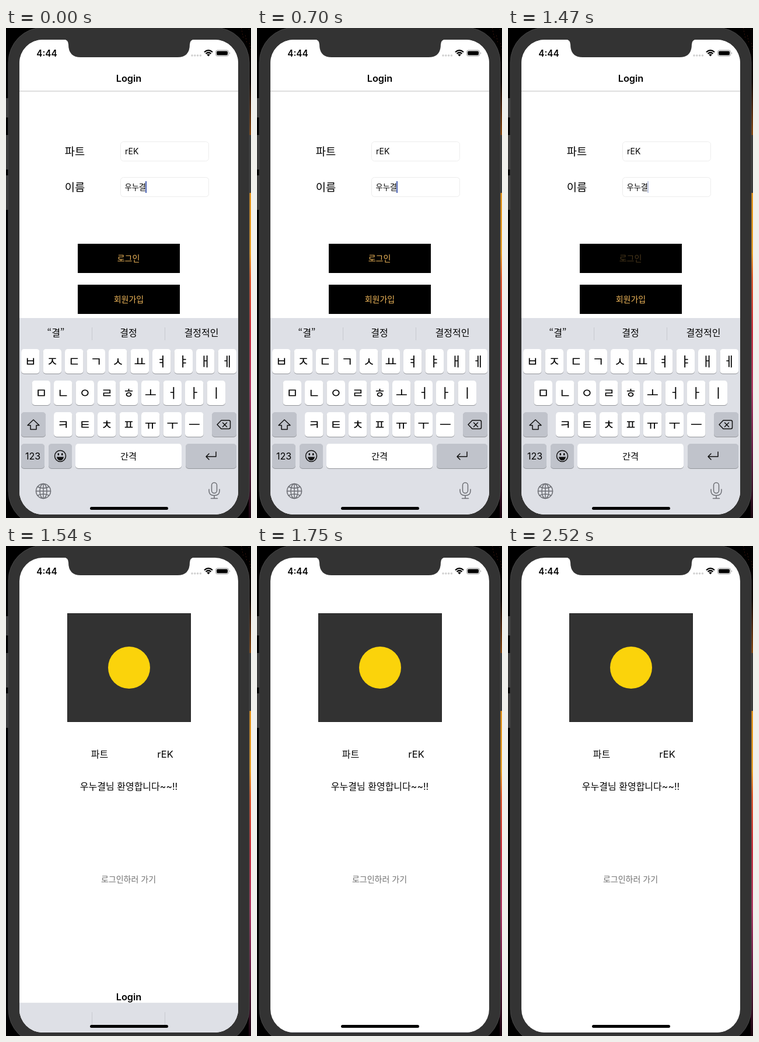
Animation, 420 px wide and 838 px high, one loop 2870 ms. Source, as an HTML page:

```html
<!DOCTYPE html>
<html lang="ko">
<head>
<meta charset="utf-8">
<title>Login</title>
<style>
  html, body { margin: 0; width: 100%; height: 100%; overflow: hidden; background: #000; }
  svg { display: block; width: 420px; height: 838px; }
  text { font-family: 'Noto Sans CJK KR', 'Noto Sans CJK', sans-serif; white-space: pre; }
  .latin { font-family: Inter, 'Noto Sans CJK KR', sans-serif; }
  .line { fill: none; stroke: #111; stroke-width: 1.5; stroke-linejoin: round; stroke-linecap: round; }
  .soft { stroke: #6c6e74; }
</style>
</head>
<body>
<svg viewBox="0 0 420 838">
  <defs>
    <clipPath id="screenClip"><rect x="23" y="20" width="375" height="812" rx="40"/></clipPath>
    <linearGradient id="wall" x1="0" y1="0" x2="0" y2="1">
      <stop offset="0" stop-color="#000"/>
      <stop offset=".11" stop-color="#0c0503"/>
      <stop offset=".16" stop-color="#4b250e"/>
      <stop offset=".22" stop-color="#8a4a12"/>
      <stop offset=".34" stop-color="#e3941c"/>
      <stop offset=".46" stop-color="#e8a02a"/>
      <stop offset=".51" stop-color="#dd5a30"/>
      <stop offset=".62" stop-color="#c83040"/>
      <stop offset=".74" stop-color="#b03a66"/>
      <stop offset=".86" stop-color="#6a1f48"/>
      <stop offset="1" stop-color="#1c0812"/>
    </linearGradient>
  </defs>

  <rect width="420" height="838"/>
  <rect x="416" width="4" height="838" fill="url(#wall)"/>
  <g id="specks" fill="#5c2416"></g>
  <g fill="#3d3d3d">
    <rect y="120" width="6" height="33"/>
    <rect y="183" width="6" height="59"/>
    <rect y="252" width="6" height="59"/>
    <rect x="415" y="183" width="5" height="99"/>
  </g>
  <rect x="4" y="-1" width="413" height="853" rx="60" fill="#333" stroke="#444"/>

  <g clip-path="url(#screenClip)">
    <rect x="23" y="20" width="375" height="812" fill="#fff"/>
    <g id="home">
      <rect x="105.500" y="115.500" width="211" height="185" fill="#323232" stroke="#262626"/>
      <circle cx="211" cy="208" r="36" fill="#fbd30b"/>
    </g>
    <g id="login">
      <rect x="23" y="20" width="375" height="812" fill="#fff"/>
      <rect x="23" y="107.500" width="375" height="1" fill="#bdbdbd"/>
      <g fill="#fff" stroke="#ececec">
        <rect x="196.500" y="194.500" width="151" height="33" rx="5"/>
        <rect x="196.500" y="255.500" width="151" height="33" rx="5"/>
      </g>
      <rect x="123" y="369" width="175" height="50"/>
      <rect x="123" y="439" width="175" height="50"/>
      <rect id="caret" x="239" y="262" width="2" height="20" fill="#4a62b4"/>
    </g>
    <g id="keyboard">
      <rect x="23" y="496" width="375" height="340" fill="#dee0e6"/>
      <path d="M147.500 512V534M272.500 512V534" stroke="#c8cad0"/>
      <g id="hints"></g>
      <g id="keys"></g>
      <path class="line" d="M47 670L57 679.500H52V686.500H42V679.500H37Z"/>
      <path class="line" d="M369 671H382Q384.500 671 384.500 673.500V683Q384.500 685.500 382 685.500H369L362 678.200ZM371.500 675L378.500 682M378.500 675L371.500 682"/>
      <path class="line" d="M360 725V733H343M348 728L343 733L348 738"/>
      <circle class="line" cx="93" cy="732" r="9.500"/>
      <path d="M87 733.500H99Q98 739.500 93 739.500T87 733.500Z" fill="#111"/>
      <ellipse cx="89.800" cy="729" rx="1.300" ry="1.900"/>
      <ellipse cx="96.200" cy="729" rx="1.300" ry="1.900"/>
      <g class="line soft">
        <circle cx="64" cy="792" r="12.500"/>
        <ellipse cx="64" cy="792" rx="6" ry="12.500"/>
        <path d="M64 779.500V804.500M51.500 792H76.500M54 784.500Q64 789.500 74 784.500M54 799.500Q64 794.500 74 799.500"/>
        <rect x="352.500" y="777.500" width="9" height="18" rx="4.500"/>
        <path d="M348 789V791.500Q348 799.500 357 799.500T366 791.500V789M357 799.500V804.500M351.500 804.500H362.500"/>
      </g>
    </g>
    <g id="status">
      <g fill="#d0d0d0">
        <circle cx="319" cy="47" r="1.800"/><circle cx="323.800" cy="47" r="1.800"/>
        <circle cx="328.600" cy="47" r="1.800"/><circle cx="333.400" cy="47" r="1.800"/>
      </g>
      <path d="M340 41.300Q347 35 354 41.300M342.500 44Q347 40 351.500 44" fill="none" stroke="#000" stroke-width="2.200"/>
      <path d="M344.200 45.600Q347 43.300 349.800 45.600L347 48.500Z"/>
      <rect x="359.500" y="38" width="22" height="10" rx="3" fill="none" stroke="#9a9a9a"/>
      <rect x="361" y="39.500" width="19" height="7" rx="1.700"/>
      <path d="M383 41.200Q385 43 383 44.800Z" fill="#9a9a9a"/>
    </g>
    <rect x="144" y="819" width="134" height="5" rx="2.500"/>
  </g>
  <path d="M98 19Q107 20 107 28Q107 50 128 50H294Q315 50 315 28Q315 20 324 19Z" fill="#333"/>
</svg>
<script>
const NS = 'http://www.w3.org/2000/svg';
const $ = id => document.getElementById(id);
const NAME = '우누결', PART = 'rEK';

function add(parent, tag, attrs, content = '') {
  const el = document.createElementNS(NS, tag);
  for (const key in attrs) el.setAttribute(key, attrs[key]);
  el.textContent = content;
  return $(parent).appendChild(el);
}

// Text is placed by its optical middle line.
function label(parent, content, x, middle, size, options = {}) {
  return add(parent, 'text', {
    x, y: middle + size * 0.37, 'font-size': size, 'text-anchor': 'middle', ...options
  }, content);
}

const latin = { class: 'latin' };
const bold = { class: 'latin', 'font-weight': 600 };
const left = { 'text-anchor': 'start' };
const amber = { fill: '#f0b75a' };

label('status', '4:44', 70, 43, 15.3, bold);
label('home', '파트', 160.5, 356, 16);
label('home', PART, 273, 356, 16.5, latin);
label('home', NAME + '님 환영합니다~~!!', 210.5, 411, 16, latin);
label('home', '로그인하러 가기', 210, 570, 14, { fill: '#707070' });

label('login', 'Login', 210.5, 86, 16.3, bold);
label('login', '파트', 118, 211, 18.7);
label('login', '이름', 118, 272, 18.7);
label('login', PART, 204, 211, 14, { ...latin, ...left });
label('login', NAME, 203.5, 272, 13.2, left);
const loginText = label('login', '로그인', 210, 394, 14, amber);
label('login', '회원가입', 210.5, 464, 14, amber);

label('hints', '“결”', 85.5, 521, 16);
label('hints', '결정', 210, 521, 16);
label('hints', '결정적인', 335, 521, 16);

function key(x, y, width, content, size = 22, fill = '#fff') {
  add('keys', 'rect', { x, y: y + 1, width, height: 42, rx: 5, fill: '#94969b' });
  add('keys', 'rect', { x, y, width, height: 42, rx: 5, fill });
  label('keys', content, x + width / 2, y + 21, size, size === 16 ? latin : {});
}

[['ㅂㅈㄷㄱㅅㅛㅕㅑㅐㅔ', 26], ['ㅁㄴㅇㄹㅎㅗㅓㅏㅣ', 44.5], ['ㅋㅌㅊㅍㅠㅜㅡ', 82]]
  .forEach(([letters, x], row) =>
    [...letters].forEach((c, i) => key(x + i * 37.5, 549 + row * 54, 31.5, c)));

const GREY = '#c0c3cb';
key(26, 657, 42, '', 22, GREY);
key(353, 657, 42, '', 22, GREY);
key(26, 711, 40, '123', 16, GREY);
key(73, 711, 40, '', 22, GREY);
key(119, 711, 182, '간격', 15.3);
key(308, 711, 87, '', 22, GREY);

for (let i = 0; i < 16; i++) {
  add('specks', 'rect', { x: 403 + (i * 7) % 17, y: (i * 13) % 60, width: 1, height: 1 });
}

const LOOP = 2870, STEP = 70, BLINK = 1050;
const PRESS = 1470, DISMISS = 1540;
const clamp = v => Math.max(0, Math.min(1, v));

function caretOpacity(t) {
  const u = t % BLINK;
  return u < 350 ? clamp(1 - u / 320) : clamp((u - 350) / 210);
}

// Critically damped spring, already under way when the sheet first moves.
function slide(t) {
  if (t < DISMISS) return 0;
  const phase = 3.34 + 18.26 * (t - DISMISS) / 1000;
  return 1 - (1 + phase) * Math.exp(-phase);
}

function draw() {
  const t = Math.floor(performance.now() % LOOP / STEP) * STEP;
  const p = slide(t);
  $('login').setAttribute('transform', `translate(0 ${809 * p})`);
  $('keyboard').setAttribute('transform', `translate(0 ${337 * p})`);
  $('hints').setAttribute('opacity', p ? 0 : 1);
  $('caret').setAttribute('opacity', caretOpacity(t));
  loginText.setAttribute('opacity', t >= PRESS ? 0.3 : 1);
  requestAnimationFrame(draw);
}
draw();
</script>
</body>
</html>
```
